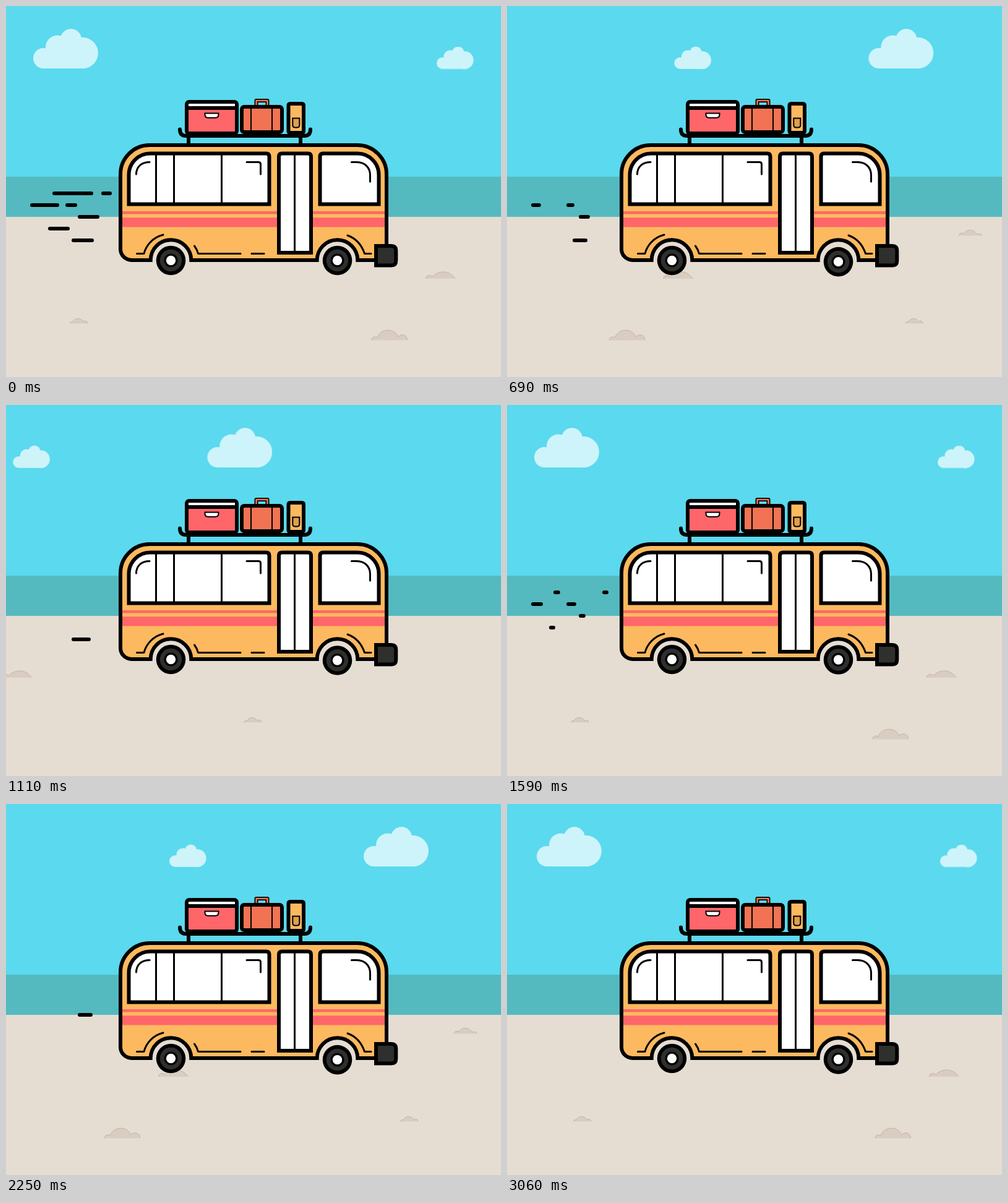
An HTML page that plays this animation: 800 px wide and 600 px high, repeating every 3090 ms.

```html
<!DOCTYPE html>
<html lang="en">
<head>
<meta charset="utf-8">
<title>Beach bus</title>
<style>
  html, body { margin: 0; width: 100%; height: 100%; overflow: hidden; }
  svg { display: block; width: 100vw; height: 100vh; }
  .ink { stroke: #000; stroke-width: 6; }
  .thin { fill: none; stroke: #000; stroke-width: 3; stroke-linecap: round; stroke-linejoin: round; }
  .fine { stroke: #000; stroke-width: 2; }
  .rock { fill: #d9cdc1; stroke: #c5b2a3; stroke-width: 1; }
  #speed { stroke: #000; stroke-width: 6; stroke-linecap: round; }
</style>
</head>
<body>
<svg viewBox="0 0 800 600">
  <defs>
    <g id="cloud">
      <circle cx="16.5" cy="47.5" r="16.5"/>
      <circle cx="39" cy="29.5" r="19"/>
      <circle cx="61" cy="17" r="17"/>
      <circle cx="79.7" cy="39" r="25.2"/>
      <path d="M16.5 64V40L40 20H66L80 30V64Z"/>
    </g>
    <g id="wheel">
      <circle r="23.8"/>
      <circle r="17.8" fill="#2f302d"/>
      <circle r="11"/>
      <circle r="7.7" fill="#fff"/>
    </g>
    <g id="scenery">
      <g fill="#fff" opacity=".7">
        <use href="#cloud" x="44" y="37"/>
        <use href="#cloud" transform="translate(696 65.5) scale(.568)"/>
      </g>
      <g class="rock">
        <path d="M678.5 441C678.5 436 684 434 689 437.5C700 427 717 427 726 441"/>
        <path d="M591 540.5C591 536 595 534 600 536C606 520.5 628 520.5 634 535C639 529 649 532 648.5 540.5"/>
        <path d="M103.5 513.5Q104 510 108 511C112 503.5 121 504 125 510.5Q131 507.5 132 513.5"/>
        <path d="M190 371.5Q191 365.5 198 368C203 360.5 214 360.5 219 369Q226 367 227.5 371.5"/>
      </g>
    </g>
  </defs>

  <path d="M0 0H800V276H0Z" fill="#5bd9ee"/>
  <path d="M0 276H800V341H0Z" fill="#54bac0"/>
  <path d="M0 341H800V600H0Z" fill="#e5ddd2"/>
  <use id="near" href="#scenery"/>
  <use id="far" href="#scenery"/>
  <g id="speed"></g>

  <!-- rack and luggage -->
  <g class="ink" fill="none" stroke-linecap="round">
    <path d="M281 199.5Q281 210 291 210H482Q492 210 492 199.5"/>
    <path d="M295 210V223M476 210V223"/>
  </g>
  <rect class="ink" x="292" y="155" width="81" height="51" rx="4" fill="#ff666a"/>
  <path d="M295 158H370V165H295Z" fill="#fff"/>
  <path class="ink" d="M292 165H373"/>
  <path class="fine" d="M321.5 173.5H343.5V175.5Q343.5 180.7 338.5 180.7H326.5Q321.5 180.7 321.5 175.5Z" fill="#fff"/>
  <g fill="none" stroke-linejoin="round">
    <path class="ink" d="M404.5 162V153H422.5V162"/>
    <path d="M404.5 162V153H422.5V162" stroke="#f27354" stroke-width="2.5"/>
  </g>
  <rect class="ink" x="381" y="163" width="65" height="41" rx="4" fill="#f27354"/>
  <path class="fine" d="M396 163V204M430 163V204"/>
  <rect class="ink" x="456.5" y="158" width="24.5" height="47" rx="2.5" fill="#fdb95f"/>
  <path class="fine" d="M463.3 181.5H474.3V192.5Q474.3 196.5 470.3 196.5H467.3Q463.3 196.5 463.3 192.5Z" fill="#df9f4e"/>

  <!-- body -->
  <path id="body" fill="#fdb95f" d="M185 272A47 47 0 0 1 232 225H568A47 47 0 0 1 615 272V411H568.3A32.8 32.8 0 0 0 502.7 411H299.3A32.8 32.8 0 0 0 233.7 411H203A18 18 0 0 1 185 393Z"/>
  <path d="M185 332H615V336.5H185ZM185 342.3H615V357.6H185Z" fill="#ff666a"/>
  <use href="#body" class="ink" style="fill-opacity:0"/>

  <!-- windows and door -->
  <g class="ink" fill="#fff">
    <path d="M198.5 320.5V273A34.5 34.5 0 0 1 233 238.5H420.5Q425.5 238.5 425.5 243.5V320.5Z"/>
    <path d="M507.5 320.5V243.5Q507.5 238.5 512.5 238.5H568A34.5 34.5 0 0 1 602.5 273V320.5Z"/>
    <path d="M441 399V243.5Q441 238.5 446 238.5H488Q493 238.5 493 243.5V399Z"/>
  </g>
  <g class="thin">
    <path d="M242.5 239V320M271.5 239V320M348.5 239V320M466.5 239V398"/>
    <path d="M210.5 272C210.5 260 219 252.5 232 252.5M389 252.5H408Q411.5 252.5 411.5 256V272"/>
    <path d="M558.5 252.5H566C580 252.5 588.5 261 588.5 274V284"/>
    <path d="M211.5 400.5H223C226 388 237 374 254 370"/>
    <path d="M304.5 388Q309 394 310.5 400.5H379M397 400.5H417"/>
    <path d="M552 371C566 376 575 387 579.5 400.5H590"/>
  </g>
  <path class="ink" fill="#2f302d" d="M598 388H623Q630.3 388 630.3 395.5V412Q630.3 419.5 623 419.5H598Z"/>
  <use href="#wheel" x="266.5" y="411.5"/>
  <use id="front" href="#wheel" x="535.5" y="411.5"/>
</svg>
<script>
const LOOP = 3090, STEP = 30, TILE = 966;
const SHRINK = 360;   // time a speed line takes to vanish
const BOUNCE = 195;   // front wheel bounce period
const $ = id => document.getElementById(id);

// x, y, length and the moments each line snaps back to full length
const lines = [
  { x: 78,  y: 303, len: 60, starts: [0, 1259, 1840] },
  { x: 157, y: 303, len: 11, starts: [0, 700, 1360, 2412] },
  { x: 42,  y: 322, len: 41, starts: [0, 416, 1345, 2398] },
  { x: 99,  y: 322, len: 13, starts: [0, 524, 1507, 1880] },
  { x: 119, y: 341, len: 29, starts: [0, 478, 1291, 2113, 2640] },
  { x: 71,  y: 360, len: 29, starts: [0, 720, 1280, 1870, 2660] },
  { x: 109, y: 379, len: 30, starts: [0, 546, 1049, 1700, 2650] }
];
for (const line of lines) {
  line.el = document.createElementNS('http://www.w3.org/2000/svg', 'path');
  $('speed').append(line.el);
}

// Two passes of the scenery, the second slightly faster
function scroll(t) {
  const pass = t < 1590 ? t / 1566 : (t - 1590) / 1476;
  return TILE * Math.min(1, pass);
}

function render(t) {
  const shift = scroll(t);
  $('near').setAttribute('x', -shift);
  $('far').setAttribute('x', TILE - shift);
  $('front').setAttribute('y', 411.5 + 1.1 * (1 - Math.cos(2 * Math.PI * t / BOUNCE)));
  for (const { el, x, y, len, starts } of lines) {
    const start = Math.max(...starts.filter(s => s <= t));
    const left = 1 - (t - start) / SHRINK;
    el.setAttribute('d', left > 0 ? `M${x} ${y}h${len * left}` : '');
  }
}

const origin = performance.now();
function tick() {
  const t = (performance.now() - origin) % LOOP;
  render(Math.floor(t / STEP) * STEP);
  requestAnimationFrame(tick);
}
tick();
</script>
</body>
</html>
```
